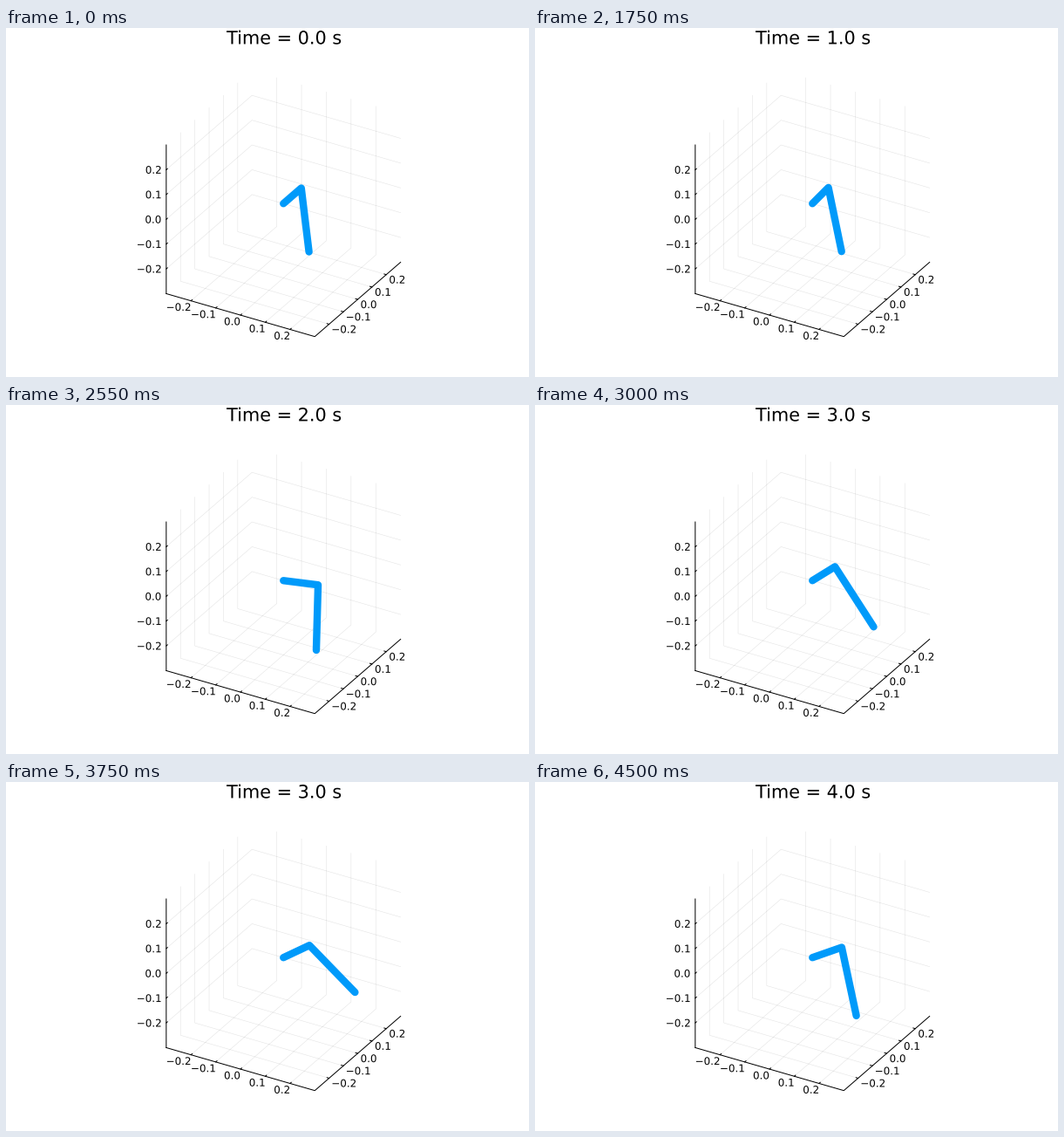
Animation, 600 px wide and 400 px high, one loop 4550 ms. Source, as a matplotlib script:

```python
import numpy as np
import matplotlib.pyplot as plt
from matplotlib.animation import FuncAnimation
from matplotlib.patches import PathPatch
from matplotlib.path import Path
from matplotlib.textpath import TextPath

W, H, DPI = 600, 400, 100
PX = 72 / DPI                      # points per pixel
FRAMES, STEP = 91, 50
CX, CY, SCALE = 318.25, 201.25, 328
TILT = np.radians(30)              # azimuth and elevation of the view
LIM = 0.3
ARM, ROD = 0.125, 0.25

plt.rcParams["font.family"] = "DejaVu Sans"

# Turning points (time, angle) of the arm and of the hanging rod
ARM_TURNS = [(0, 0), (1, -0.073), (1.3, -0.03), (1.7, -0.06), (2.16, -0.08),
             (2.7, 1.59), (3.11, -0.13), (4.3, 0.624), (4.65, 0.32)]
ROD_TURNS = [(0, 0.125), (0.47, -0.16), (0.97, 0.137), (1.35, -0.19),
             (1.75, 0.208), (2.25, -0.38), (2.95, 0.865), (3.3, -1.02),
             (3.8, 1.25), (4.2, -0.9), (4.65, 0.787)]


def swing(turns, t):
    """Half a cosine wave from each turning point to the next."""
    for (t0, a), (t1, b) in zip(turns, turns[1:]):
        if t <= t1:
            return a + (b - a) * (1 - np.cos(np.pi * (t - t0) / (t1 - t0))) / 2


def project(x, y, z):
    c, s = np.cos(TILT), np.sin(TILT)
    px = CX + SCALE * (c * x + s * y)
    py = CY + SCALE * (s * (s * x - c * y) - c * z)
    return px, py


def linkage(t):
    phi, theta = swing(ARM_TURNS, t), swing(ROD_TURNS, t)
    jx, jy = ARM * np.sin(phi), ARM * np.cos(phi)
    side = ROD * np.sin(theta)
    ex, ey = jx + side * np.cos(phi), jy - side * np.sin(phi)
    return project(np.array([0, jx, ex]), np.array([0, jy, ey]),
                   np.array([0, 0, -ROD * np.cos(theta)]))


def text_path(x, y, text, size, align):
    """Glyph outlines; align 0, 0.5, 1 puts the left, middle, right at x."""
    glyphs = TextPath((0, 0), text, size=size)
    box = glyphs.get_extents()
    left = x - box.x0 - align * box.width
    return Path(glyphs.vertices * [1, -1] + [left, y], glyphs.codes)


fig = plt.figure(figsize=(W / DPI, H / DPI), dpi=DPI, facecolor="white")
ax = fig.add_axes([0, 0, 1, 1])
ax.set_xlim(0, W)
ax.set_ylim(H, 0)
ax.axis("off")


def line(*points, **style):
    xs, ys = zip(*(project(*p) for p in points))
    ax.plot(xs, ys, snap=False, **style)


def add_text(path):
    return ax.add_patch(PathPatch(path, color="black", lw=0, snap=False))


def label(x, y, value, align):
    text = f"{value:.1f}".replace("-", "\u2212")
    add_text(text_path(x, y + 4.4, text, 11.9, align))


grid = dict(color="black", alpha=0.1, lw=0.6 * PX)
edge = dict(color="black", lw=1.0 * PX, solid_capstyle="projecting")
tick = 0.014 * 2 * LIM

for v in np.arange(-2, 3) / 10:
    line((v, -LIM, -LIM), (v, LIM, -LIM), (v, LIM, LIM), **grid)
    line((LIM, v, -LIM), (-LIM, v, -LIM), (-LIM, v, LIM), **grid)
    line((-LIM, -LIM, v), (-LIM, LIM, v), (LIM, LIM, v), **grid)

    line((v, -LIM, -LIM), (v, -LIM + tick, -LIM), **edge)
    line((LIM, v, -LIM), (LIM - tick, v, -LIM), **edge)
    line((-LIM, -LIM, v), (-LIM, -LIM + tick, v), **edge)

    x, y = project(v, -LIM, -LIM)
    label(x - 0.9, y + 7, v, 1)
    x, y = project(LIM, v, -LIM)
    label(x + 3.9, y + 5.6, v, 0)
    x, y = project(-LIM, -LIM, v)
    label(x - 6.3, y, v, 1)

line((-LIM, -LIM, LIM), (-LIM, -LIM, -LIM), **edge)
line((-LIM, -LIM, -LIM), (LIM, -LIM, -LIM), (LIM, LIM, -LIM), **edge)


def title_path(seconds):
    return text_path(318.6, 18.4, f"Time = {seconds:.1f} s", 20.8, 0.5)


title = add_text(title_path(0))
rods, = ax.plot([], [], color="#009AFA", lw=8.4 * PX, zorder=5,
                solid_capstyle="round", solid_joinstyle="round")


def draw(i):
    ms = i * STEP
    rods.set_data(*linkage(ms / 1000))
    title.set_path(title_path(ms // 1000))
    return rods, title


anim = FuncAnimation(fig, draw, frames=FRAMES, interval=STEP, repeat=True)
plt.show()
```
